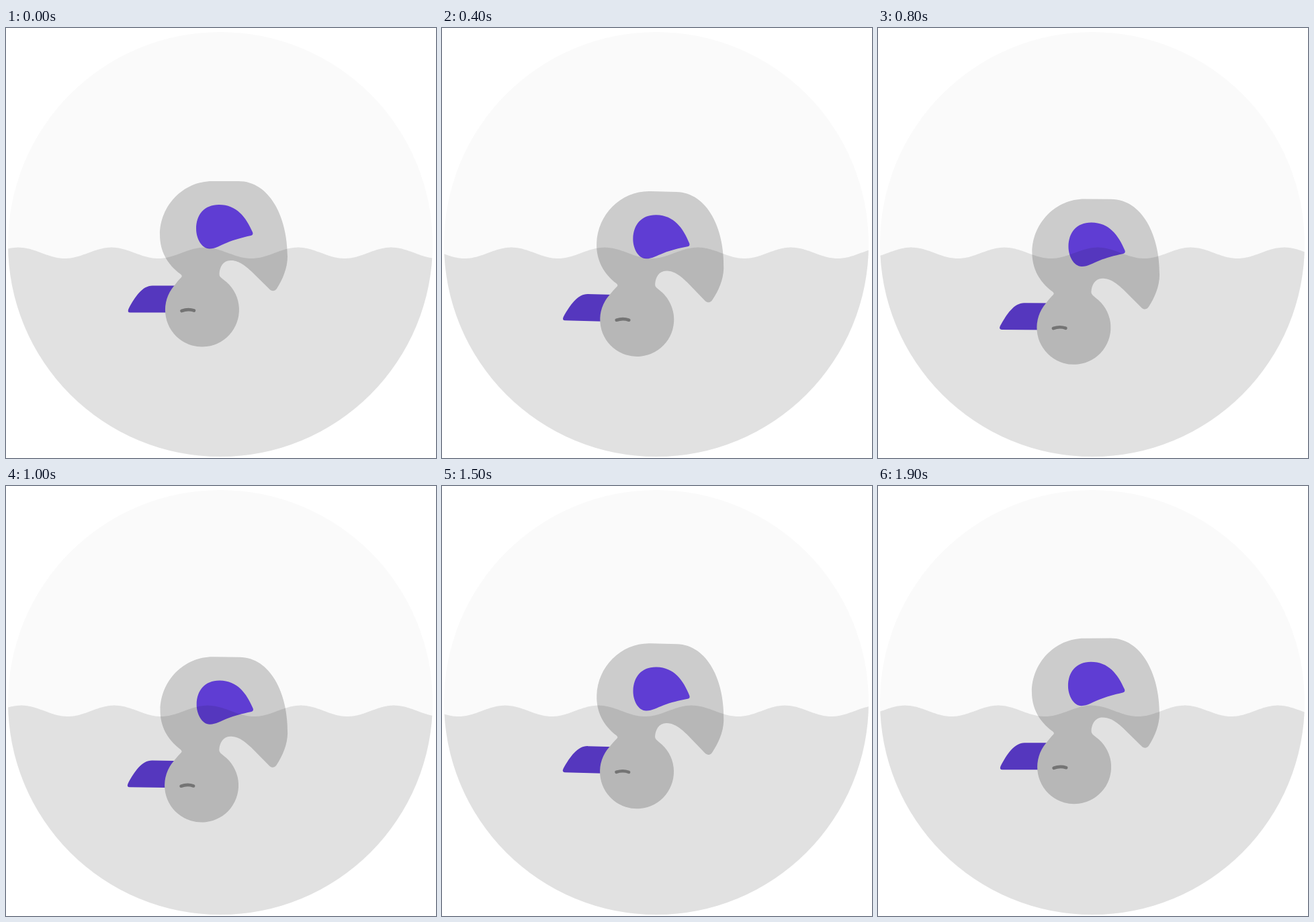
Recreate the animation shown at these times as an HTML page with a canvas. Size 640 by 640 pixels, loop 2000 ms.

```html
<!DOCTYPE html>
<html lang="en">
<head>
<meta charset="utf-8">
<title>Diving duck</title>
<style>
html, body { margin: 0; width: 100%; height: 100%; overflow: hidden; background: #fff; }
canvas { display: block; width: 640px; height: 640px; }
</style>
</head>
<body>
<canvas id="stage" width="640" height="640"></canvas>
<script>
const ctx = document.getElementById('stage').getContext('2d');
const LOOP = 2000, STEP = 100, KEY_GAP = 200;

// Duck pose every 200 ms: downward offset in px, tilt in degrees
const sink = [0, 7.3, 14.7, 21.4, 26.4, 26.2, 17.2, 9.2, 3.2, -1.2];
const tilt = [0.05, 1.05, 1.45, 1.1, 0.5, 0.75, 1.75, 1.85, 1.25, 0.05];
const pivot = { x: 300, y: 351 };

const wave = { mid: 334.8, height: 8.2, length: 138.75, crest: 157, speed: 0.1345 };

const body = new Path2D(`M307 228 H346 C392 228 419 281 419 340
  C419 357 412 374 403 388 C400 392 396 392 393 389.5 L365 362
  C351 349 343 346 334 346 C323 346 318 356 317.5 366
  Q317.3 369 319.5 371 L324 374.8 A55 55 0 1 1 250 384
  C254 379 257 375 261 371 Q263 369 260 366.5
  C240 352 229 332 229 308 C229 264 264 228 307 228 Z`);
const wing = new Path2D(`M317 263 C343 263 357 281 367 304
  Q368.5 308 364.5 309 C351 312 340 315 329 319.5
  C319 323.5 312 328.5 303 328.5 C291 328.5 283 313 283 299
  C283 278 295 263 317 263 Z`);
const bill = new Path2D(`M265 383.5 H218 C203 383.5 192 400 182.5 418
  Q180 423.5 185 423.5 H260 Z`);
const eye = new Path2D('M261.5 421 Q271 417.5 280 420.5');

// Smooth cyclic curve through evenly spaced keys
function sample(keys, t) {
  const n = keys.length;
  const i = Math.floor(t / KEY_GAP), u = t / KEY_GAP - i;
  const [a, b, c, d] = [-1, 0, 1, 2].map(k => keys[(i + k + n) % n]);
  return b + 0.5 * u * (c - a + u * (2 * a - 5 * b + 4 * c - d + u * (3 * (b - c) + d - a)));
}

function fill(path, color) {
  ctx.fillStyle = color;
  ctx.fill(path);
}

function drawDuck(t) {
  ctx.save();
  ctx.translate(pivot.x, pivot.y + sample(sink, t));
  ctx.rotate(sample(tilt, t) * Math.PI / 180);
  ctx.translate(-pivot.x, -pivot.y);
  fill(bill, '#5f3dd3');
  fill(body, '#ccc');
  fill(wing, '#5f3dd3');
  ctx.strokeStyle = '#818181';
  ctx.lineWidth = 4.7;
  ctx.lineCap = 'round';
  ctx.stroke(eye);
  ctx.restore();
}

function drawWater(t) {
  const crest = wave.crest - wave.speed * t;
  ctx.beginPath();
  ctx.moveTo(0, 640);
  for (let x = 0; x <= 640; x += 2) {
    ctx.lineTo(x, wave.mid - wave.height * Math.cos((x - crest) / wave.length * 2 * Math.PI));
  }
  ctx.lineTo(640, 640);
  ctx.closePath();
  ctx.fillStyle = 'rgba(0, 0, 0, 0.1)';
  ctx.fill();
}

function draw(t) {
  ctx.fillStyle = '#fff';
  ctx.fillRect(0, 0, 640, 640);
  ctx.save();
  ctx.beginPath();
  ctx.arc(319, 322, 316, 0, 2 * Math.PI);
  ctx.fillStyle = '#fafafa';
  ctx.fill();
  ctx.clip();
  drawDuck(t);
  drawWater(t);
  ctx.restore();
}

const start = performance.now();
function tick() {
  const t = (performance.now() - start) % LOOP;
  draw(Math.floor(t / STEP) * STEP);
  requestAnimationFrame(tick);
}
tick();
</script>
</body>
</html>
```
